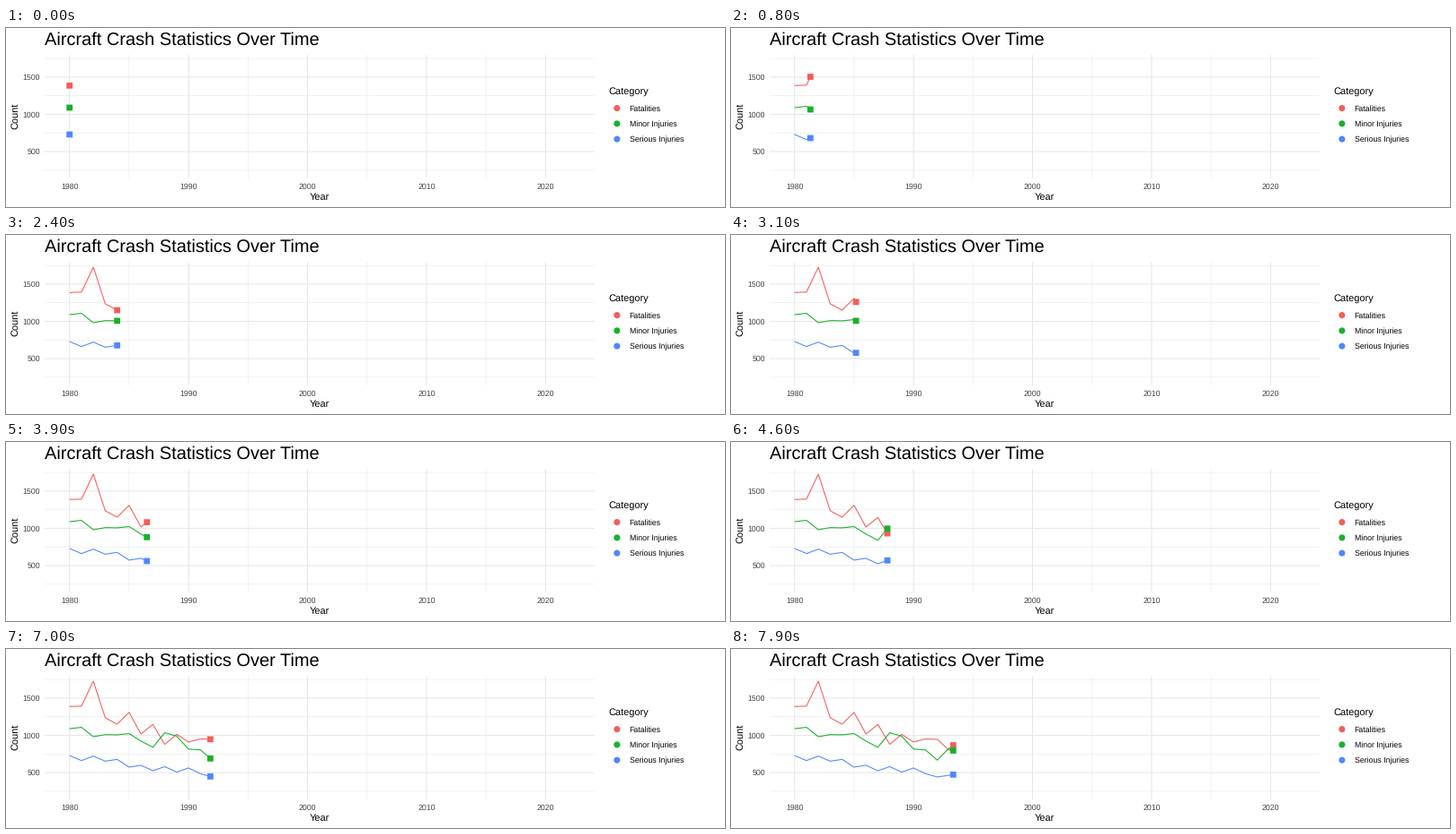
Write a matplotlib script that moves like this. It is 800 px wide and 200 px high and loops after 8000 ms.

```python
import numpy as np
import matplotlib.pyplot as plt
from matplotlib.animation import FuncAnimation
from matplotlib.patches import Circle, Rectangle

W, H, DPI = 800, 200, 100
PX = 72 / DPI  # points per pixel
FRAMES, INTERVAL = 80, 100
STEPS, SPAN = 249, 42  # steps of the full reveal, years it covers

plt.rcParams.update({
    "font.family": "Liberation Sans",
    "text.hinting": "none",
    "path.simplify": False,
})

LEFT, RIGHT, TOP, BOTTOM = 42.9, 654.6, 29.6, 167.5
GRID, GREY = "#E7E7E7", "#444444"
HEAD = 6.8

k = np.arange(15)
years = 1980 + k

# Serious injuries: a falling trend with a two-year zigzag up to 1990.
trend = np.interp(k, [0, 3, 6, 10, 12, 14], [698, 685, 566, 530, 441, 489])
zigzag = np.where(k <= 10, 32 * (-1.0) ** k, 0)

SERIES = [
    ("Fatalities", "#F35E5A",
     np.array([1387, 1393, 1728, 1236, 1150, 1309, 1018, 1147, 879, 1014,
               911, 952, 947, 796, 1010])),
    ("Minor Injuries", "#17B12B",
     np.array([1090, 1108, 982, 1010, 1007, 1024, 924, 840, 1036, 990,
               816, 805, 667, 832, 724])),
    ("Serious Injuries", "#5086FF", trend + zigzag),
]

# Each year is reached on a whole step; the head moves evenly between them.
year_steps = np.round(k * STEPS / SPAN)

fig = plt.figure(figsize=(W / DPI, H / DPI), dpi=DPI, facecolor="white")

ax = fig.add_axes([LEFT / W, 1 - BOTTOM / H,
                   (RIGHT - LEFT) / W, (BOTTOM - TOP) / H])
ax.set(xlim=(1980 - 0.05 * SPAN, 2022 + 0.05 * SPAN), ylim=(146.6, 1804.1))
ax.axis("off")

# Text, legend and heads are placed in pixels, above the panel.
page = fig.add_axes([0, 0, 1, 1], zorder=1)
page.set(xlim=(0, W), ylim=(H, 0))
page.axis("off")


def label(x, y, s, size, color="black", ha="left", **kw):
    page.text(x, y, s, fontsize=size * PX, color=color, ha=ha,
              va="baseline", **kw)


def to_page(x, y):
    px, py = ax.transData.transform((x, y))
    return px, H - py


def grid(draw, values, width):
    for v in values:
        draw(v, color=GRID, lw=width * PX, snap=False, zorder=1)


grid(ax.axhline, range(250, 1751, 500), 0.53)
grid(ax.axvline, range(1985, 2016, 10), 0.53)
grid(ax.axhline, range(500, 1501, 500), 1.07)
grid(ax.axvline, range(1980, 2021, 10), 1.07)

for year in range(1980, 2021, 10):
    label(to_page(year, 0)[0], 180, str(year), 8.8, GREY, "center")
for count in range(500, 1501, 500):
    label(38, to_page(1980, count)[1] + 3.1, str(count), 8.8, GREY, "right")

label(42.6, 19.2, "Aircraft Crash Statistics Over Time", 20.06)
label((LEFT + RIGHT) / 2, 192, "Year", 11, ha="center")
label(13.6, (TOP + BOTTOM) / 2, "Count", 11, ha="center",
      rotation=90, rotation_mode="anchor")
label(670.6, 74.2, "Category", 11)

lines, heads = [], []
for i, (name, color, _) in enumerate(SERIES):
    y = 89.6 + 17.28 * i
    page.add_patch(Circle((679.8, y), 3.55, fc=color, lw=0))
    label(693.5, y + 3.1, name, 8.8)
    lines += ax.plot([], [], color=color, lw=1.07 * PX, snap=False,
                     solid_capstyle="butt", zorder=3)
    heads.append(page.add_patch(
        Rectangle((0, 0), HEAD, HEAD, fc=color, lw=0, snap=False)))


def update(step):
    now = np.interp(step, year_steps, years)
    past = years < now
    xs = np.append(years[past], now)
    for (_, _, counts), line, head in zip(SERIES, lines, heads):
        ys = np.append(counts[past], np.interp(now, years, counts))
        line.set_data(xs, ys)
        x, y = to_page(now, ys[-1])
        head.set_xy((x - HEAD / 2, y - HEAD / 2))
    return lines + heads


anim = FuncAnimation(fig, update, frames=FRAMES, interval=INTERVAL,
                     repeat=True, repeat_delay=0, blit=False)
plt.show()
```
